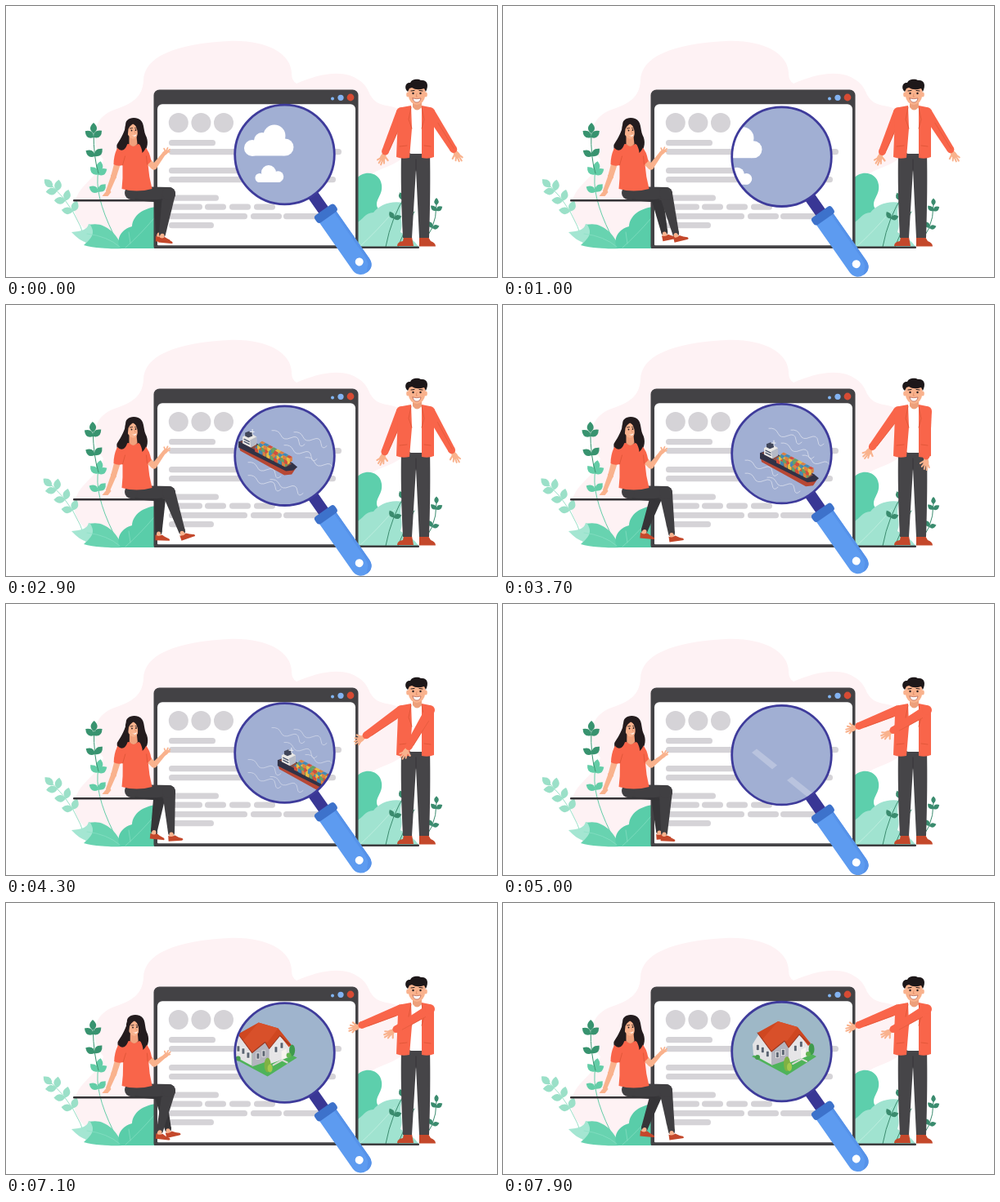
An HTML page with a canvas that plays this animation: 600 by 332 pixels, repeating every 8000 ms.

```html
<!DOCTYPE html>
<html lang="en">
<head>
<meta charset="utf-8">
<title>Search illustration</title>
<style>
html, body { margin: 0; width: 100%; height: 100%; overflow: hidden; background: #fff; }
canvas { display: block; width: 600px; height: 332px; }
</style>
</head>
<body>
<canvas id="stage" width="600" height="332"></canvas>
<script>
const c = document.getElementById('stage').getContext('2d');
const LOOP = 8000;
const DARK = '#434245', ORANGE = '#f9654a', SKIN = '#f9b28d', SHOE = '#c4482b', HAIR = '#241c1e', GREY = '#d5d3d7';

const clamp = v => Math.max(0, Math.min(1, v));
const ramp = (t, a, b) => clamp((t - a) / (b - a));
const ease = p => (1 - Math.cos(Math.PI * p)) / 2;
const out = p => 1 - (1 - p) * (1 - p);

// Eased value from [time, value, time, value, ...]
function key(t, k) {
  let i = 0;
  while (i < k.length - 4 && t > k[i + 2]) i += 2;
  return k[i + 1] + (k[i + 3] - k[i + 1]) * ease(ramp(t, k[i], k[i + 2]));
}

function fill(d, color) { c.fillStyle = color; c.fill(new Path2D(d)); }
function line(d, color, w = 1) {
  c.strokeStyle = color; c.lineWidth = w; c.lineCap = 'round'; c.lineJoin = 'round';
  c.stroke(new Path2D(d));
}
function disc(x, y, r, color, ry = r, rot = 0) {
  c.fillStyle = color; c.beginPath(); c.ellipse(x, y, r, ry, rot, 0, 7); c.fill();
}
function box(x, y, w, h, r, color) {
  c.fillStyle = color; c.beginPath(); c.roundRect(x, y, w, h, r); c.fill();
}
function at(x, y, rot, draw) {
  c.save(); c.translate(x, y); c.rotate(rot); draw(); c.restore();
}
// Tapered limb with round ends
function limb(x1, y1, x2, y2, r1, r2, color) {
  const a = Math.atan2(y2 - y1, x2 - x1) + Math.PI / 2, s = Math.cos(a), n = Math.sin(a);
  c.fillStyle = color;
  c.beginPath();
  c.moveTo(x1 + s * r1, y1 + n * r1); c.lineTo(x2 + s * r2, y2 + n * r2);
  c.lineTo(x2 - s * r2, y2 - n * r2); c.lineTo(x1 - s * r1, y1 - n * r1);
  c.fill();
  disc(x1, y1, r1, color); disc(x2, y2, r2, color);
}

function leaf(x, y, len, ang, color) {
  const w = len * .62;
  at(x, y, ang, () => fill(`M0 0Q${len * .45} ${-w} ${len} 0Q${len * .45} ${w} 0 0`, color));
}
// Curved stem with leaf pairs between fractions u0 and u1
function sprig([x0, y0, cx, cy, x1, y1], u0, u1, n, len, color, tip = true) {
  line(`M${x0} ${y0}Q${cx} ${cy} ${x1} ${y1}`, color, 1);
  for (let i = 0; i < n; i++) {
    const u = u0 + (u1 - u0) * i / Math.max(1, n - 1), v = 1 - u;
    const x = v * v * x0 + 2 * u * v * cx + u * u * x1, y = v * v * y0 + 2 * u * v * cy + u * u * y1;
    const a = Math.atan2(v * (cy - y0) + u * (y1 - cy), v * (cx - x0) + u * (x1 - cx));
    leaf(x, y, len, a - .9, color);
    leaf(x, y, len, a + .9, color);
  }
  if (tip) leaf(x1, y1 + 1, len, Math.atan2(y1 - cy, x1 - cx), color);
}

function scenery(t) {
  const s = Math.sin(t / 620);
  fill('M168 92C168 62 208 46 272 43C318 41 348 58 349 82Q349 92 355 95C376 86 400 79 420 85C436 91 441 99 445 109C452 121 461 121 470 123C496 128 508 150 494 175C478 200 455 195 440 212L400 250L150 285C104 290 80 266 84 242C88 218 114 210 119 188C101 165 106 138 130 128C156 119 166 112 168 92Z', '#fef2f4');

  sprig([98, 290, 86, 248, 57 + s, 221], .5, .9, 3, 14, '#9be0c8');
  const top = 107 + s * .8;
  sprig([131, 279, 107, 230, 113, 202], .6, .92, 2, 13, '#63cda7');
  sprig([113, 205, 107, 186, top, 155], .48, .9, 2, 13, '#38936f');

  fill('M142 297C128 299 112 296 101 290C92 289 86 283 80 277C93 276 99 274 101 267C119 269 137 280 142 297Z', '#a4e6d2');
  fill('M95 293C104 285 110 279 103 268C120 264 137 279 142 297C125 297 107 297 95 293Z', '#68d3b0');
  fill('M139 297C134 284 142 273 154 270C155 256 168 248 183 246V297Z', '#59cda9');
  line('M146 296Q163 281 181 260M99 279Q124 282 139 295M152 291L150 277', '#8ae0c5', .7);

  fill('M428 212C437 200 457 203 459 219C461 232 450 237 454 247C462 255 448 270 428 282Z', '#5dcfac');
  fill('M428 296V266C436 262 439 253 449 253C456 244 470 238 485 241C478 254 487 264 482 277C492 283 500 288 505 296Z', '#a0e3d0');
  line('M432 295Q452 277 475 250', '#c5f0e3', .8);
  sprig([464, 295, 471, 258, 489, 231 + s * .5], .5, .88, 2, 10, '#3a8b6e');
  line('M479 295Q487 275 499 252', '#3a8b6e');
  sprig([505, 293, 526, 276, 526, 243 + s * .4], .5, .88, 2, 9, '#3a8b6e');
}

function browser() {
  box(82, 237, 124, 2.5, 1, '#343235');
  box(181, 294.5, 324, 2.5, 1, '#3d3c3e');
  box(180.5, 102.5, 250, 194.5, [7, 7, 2, 2], DARK);
  box(185, 120.3, 242, 173, [6, 6, 1, 1], '#fff');
  disc(399, 113.5, 2, '#82b6f3');
  disc(409, 112.3, 3.6, '#83b3f2');
  disc(421, 112, 4.4, '#d64b34');
  for (const x of [210.8, 238.4, 266]) disc(x, 143, 12, GREY);
  const bars = [[164, 199, 256], [175, 199, 410], [198, 199, 390], [209, 199, 403], [231.5, 199, 260],
    [242.5, 199, 240], [242.5, 243, 269], [242.5, 273, 299], [242.5, 303, 329],
    [254, 199, 295], [254, 299, 337], [254, 339, 386], [265, 199, 254]];
  for (const [y, a, b] of bars) box(a, y, b - a, 7.3, 3.6, GREY);
}

function shin(x, y, len, dx, r, color) {
  const a = Math.asin(dx / len), ax = x + dx, ay = y + len * Math.cos(a);
  limb(x, y, ax, ay, r, 4, color);
  limb(ax, ay + 2, ax + Math.sin(a) * 4, ay + 4, 2.5, 2.5, SKIN);
  at(ax + Math.sin(a) * 3, ay + 3.5, -Math.max(-.1, a), () =>
    fill('M-4 0Q0 3 4 0Q8 3 13 4.500Q15 7 12 7H-4Z', SHOE));
}

function woman(t) {
  const front = key(t, [0, -8, 1900, 29, 3700, 7, 5000, -2, 5800, 30, 7100, -11, 7900, 7]);
  const back = key(t, [0, -1, 1900, 18, 3700, -15, 5000, 3, 5800, 1, 7100, 10, 7900, -15]);
  const sway = key(t, [0, 0, 3700, 0, 5000, 1, 5800, 2, 7100, 1.5, 7900, 0]);
  const hx = key(t, [0, 193, 3700, 193, 5800, 195, 7900, 193]);
  const hy = key(t, [0, 181, 1900, 180, 3700, 181, 5000, 187, 5800, 193, 7100, 188, 7900, 184]);

  limb(156, 231, 188, 233, 7, 7.500, '#363538');
  shin(188, 233, 45, back, 7.500, '#363538');
  limb(153, 229, 199, 230, 8, 8, '#403f42');
  shin(199, 230, 50, front, 8, '#403f42');
  line('M158 237Q178 239 191 237', '#343336', 1);

  c.save();
  c.transform(1, 0, -sway / 75, 1, sway * 228 / 75 - .5, 0);
  fill('M147 147C145 139 154 135 162 138C170 141 168 151 171 158C175 165 174 175 168 180C160 175 152 181 144 179C139 181 135 176 136 170C139 165 144 158 147 147Z', HAIR);
  // Supporting arm
  limb(138, 188, 132, 209, 4, 3.3, SKIN);
  limb(132, 209, 125, 227, 3.3, 2.5, SKIN);
  fill('M127 225L122 228L118 233L125 233L129 228Z', SKIN);
  limb(172, 188, 181, 197, 4, 3.4, SKIN);
  fill('M151 169Q140 169 136 175Q132 184 132 194Q137 197 143 195L143 211L142 224Q160 229 179 224Q175 209 174 194L178 190Q176 178 170 172L162 169Q156 173 151 169Z', ORANGE);
  line('M143 195L146 184M173 194L172 184', '#dc5335', .8);
  fill('M151 160H160L161 169Q156 175 151 169Z', '#f1a17c');
  disc(155, 153.5, 6.6, SKIN, 9.3, -.2);
  fill('M146 151C145 142 154 137 161 141C157 143 152 146 150 151Q149 158 149 168C147 177 141 179 137 174C140 168 146 160 146 151Z', HAIR);
  fill('M155 140C165 139 167 150 168 157C174 164 174 174 167 180C167 172 161 168 161 160C162 152 160 146 155 143Z', HAIR);
  disc(154, 152.5, .9, HAIR); disc(159, 152, .9, HAIR);
  line('M152 150L155 149.500M158 149.500L160 150', HAIR, .8);
  fill('M154 158Q157 160 160 157Q159 162 154 158Z', '#fff');
  line('M157.500 153L158.500 156', '#d98662', .6);
  c.restore();

  limb(181 + sway / 3, 197, hx, hy, 3.4, 2.2, SKIN);
  at(hx, hy, -.65, () => {
    disc(2, 0, 3.4, SKIN, 2.6);
    line('M3 -1L4 -5M4 -1L8 -3M4 0L9 0M4 1L7 2', SKIN, 1.7);
  });
}

function arm(x, y, deg, len, side) {
  const a = deg * Math.PI / 180, ex = x + Math.cos(a) * len, ey = y + Math.sin(a) * len;
  at(ex, ey, a, () => {
    limb(-4, 0, 3, 0, 2.7, 2.7, SKIN);
    disc(5, 0, 4, SKIN, 3.5);
    line('M6 -2L11 -4M7 -1L14 -1M7 1L13 2M6 2L10 5', SKIN, 2);
    line(`M3 ${side * 2}L6 ${side * 7}`, SKIN, 2.2);
  });
  limb(x, y, ex - Math.cos(a) * 3, ey - Math.sin(a) * 3, 6, 4.4, ORANGE);
  line(`M${x + Math.cos(a) * 11 + 4} ${y + Math.sin(a) * 11 + 4}L${ex - Math.cos(a) * 8 + 3} ${ey - Math.sin(a) * 8 + 3}`, '#e05a3c', .7);
}

function man(t) {
  const left = key(t, [0, 112, 2900, 112, 3700, 126, 4800, 158]);
  const leftLen = key(t, [0, 55, 3700, 57, 4800, 55]);
  const right = key(t, [0, 57.700, 2700, 57.700, 3700, 91, 4900, 149]);
  const rightLen = key(t, [0, 57, 3700, 58, 4900, 51]);

  fill('M486 283H496L498 294H478Q478 289 485 288Z', SHOE);
  fill('M505 283H516L519 288Q525 290 525 294.500H505Z', SHOE);
  fill('M483 180H518Q519 224 517 284H505L501 200L496 284H485Q482 225 483 180Z', '#464548');
  line('M501 188L501 202', '#333235', .8);

  const armR = () => arm(518, 130, right, rightLen, right > 100 ? -1 : 1);
  if (right < 96) armR();
  arm(483, 130, left, leftLen, left > 130 ? 1 : -1);

  box(493, 123, 18, 58, 2, '#fff');
  fill('M497 115H508V124Q502 131 497 124Z', '#eda07b');
  fill('M495 122L484 124Q478 127 479 136L477 185Q484 188 493 186L496 150Z', ORANGE);
  fill('M508 122L518 124Q524 127 523 137L523 185Q516 188 508 186L508 150Z', ORANGE);
  line('M495 124L492 139L496 150M508 124L511 139L508 150M481 172L490 171M511 171L519 172', '#dc5335', .8);
  if (right >= 96) armR();

  disc(491, 108.500, 1.8, SKIN, 3); disc(513, 108.500, 1.8, SKIN, 3);
  fill('M491.500 98H512.500V109Q511 120 502 121Q493 120 491.500 109Z', SKIN);
  fill('M491 105C486 101 488 93 494 94C496 89 504 89 507 91C515 90 517 97 513 105L511 101Q502 104 496 100L493 101Z', '#1d1719');
  disc(497.500, 107, 1.2, HAIR); disc(506.500, 107, 1.2, HAIR);
  line('M495 104L499 103.500M505 103.500L509 104', HAIR, 1);
  line('M502 107.500L501.200 111H502.500', '#d98662', .7);
  fill('M497 113Q502 114.500 507 113Q506 118 502 118Q498 118 497 113Z', '#fff');
  line('M497 113Q502 114.500 507 113Q506 118 502 118Q498 118 497 113', '#a64a3b', .6);
}

function clouds(t) {
  c.globalAlpha = 1 - ramp(t, 1100, 1700);
  at(-t * .035, 0, 0, () => {
    disc(301, 174, 10, '#fff'); disc(313, 165, 10, '#fff'); disc(328, 159, 13.500, '#fff');
    disc(341, 173, 10.500, '#fff'); box(296, 168, 50, 15.500, 7, '#fff');
    disc(310, 210.500, 5.500, '#fff'); disc(321, 204, 9, '#fff');
    disc(332.500, 209, 6.800, '#fff'); box(306, 208, 31, 8, 4, '#fff');
  });
}

function ship(t) {
  c.globalAlpha = ramp(t, 2300, 2900) * (1 - ramp(t, 4200, 4700));
  for (const [x, y] of [[325, 151], [352, 153], [340, 169], [296, 190], [296, 206], [323, 211], [366, 184]])
    line(`M${x} ${y}q8 -1 11 6t12 3t10 5t7 3`, '#d5dbea', .9);
  c.globalAlpha = 1;
  const p = -100 * (1 - out(ramp(t, 2400, 3600))) + 110 * ramp(t, 4000, 4700) ** 2;
  at(350 + p * .88, 194 + p * .48, 0, () => {
    fill('M-36 -10L25 19L35 18L29 27L20 28L-34 -2Z', '#b74835');
    fill('M-36 -13L-25 -17L30 13L36 18L31 22L22 23L-36 -6Z', '#313246');
    fill('M-34 -13L-25 -16L29 14L22 18Z', '#8b5148');
    const hues = ['#d34f3c', '#e7bd45', '#4289b5', '#64a167', '#dc8142'];
    for (let i = 0; i < 8; i++) for (let j = 0; j < 3; j++) {
      const x = -16 + i * 4.700 + j * 2.900, y = -6 + i * 2.450 - j * 2.800;
      fill(`M${x} ${y}l4 2v5l-4 -2z`, hues[(i * 2 + j) % 5]);
      fill(`M${x + 4} ${y + 2}l3 -2v5l-3 2z`, hues[(i + j * 3 + 1) % 5]);
      fill(`M${x} ${y}l3 -2l4 2l-3 2z`, hues[(i * 3 + j + 2) % 5]);
    }
    fill('M-31 -19L-22 -24L-14 -19V-10L-21 -6L-31 -11Z', '#e9e8e6');
    fill('M-22 -15L-14 -19V-10L-21 -6Z', '#b5bac7');
    line('M-29 -16L-23 -13M-29 -13L-23 -10', '#4e5870', 1.4);
    fill('M-28 -24l5 -2 4 2v4l-5 2 -4 -2z', '#40465a');
    line('M-19 -22V-28M-17 -25H-22', '#eceff4', 1);
  });
}

function car(t) {
  c.globalAlpha = ramp(t, 4850, 5450) * (1 - ramp(t, 6300, 6700));
  for (const [x, y] of [[347, 213], [304, 179]]) fill(`M${x} ${y}l6 -4.500l25 20l-6 5z`, '#fff');
  c.globalAlpha = 1;
  const p = -75 * (1 - out(ramp(t, 5200, 5950))) + 125 * ramp(t, 6000, 6750) ** 2;
  at(308 + p * .85, 184 + p * .55, 0, () => {
    fill('M-32 4L2 26Q12 29 26 21L30 15L-10 0Z', '#7d839c');
    fill('M-33 -8L-26 -12Q-24 -22 -10 -26Q5 -29 13 -20L24 -7Q31 0 30 11Q27 20 7 24L-4 19L-32 4Z', '#c43a1e');
    fill('M-22 -18Q-10 -27 2 -26Q10 -24 13 -20L-4 -11Q-14 -16 -22 -18Z', '#dc4d2a');
    fill('M-4 -10L13 -19L23 -8Q12 -5 4 2Q2 -5 -4 -10Z', '#33363c');
    fill('M-25 -12L-22 -17Q-13 -16 -7 -10Q-2 -5 0 2L-12 -3Z', '#352b30');
    line('M-14 -14L-10 -2', '#c43a1e', 1.5);
    fill('M4 3Q12 -4 24 -7Q29 -2 30 5Q18 6 9 13Q4 9 4 3Z', '#d84926');
    line('M-29 -3L5 15M-12 -3L-8 10', '#92301d', .8);
    disc(-2, 16, 4, '#25262a', 6, -.4); disc(-2, 16, 2, '#9fa3ab', 3.300, -.4);
    disc(-27, 1, 3, '#25262a', 5, -.4);
    disc(10, 15, 3.500, '#e6e0d2', 2, -.6); disc(28, 7, 2, '#e6e0d2', 1.800);
    line('M15 18L26 13', '#4b4a4c', 2);
    line('M17 16L22 14', '#86d3b2', 2.5);
    line('M8 22Q20 21 28 15', '#9e2f1d', 1.2);
  });
}

function house(t) {
  const p = -110 * (1 - out(ramp(t, 6700, 7500)));
  if (t < 6700) return;
  at(342 + p, 178, 0, () => {
    fill('M-38 10L5 33L41 10L4 -9Z', '#4fb35a');
    fill('M-37 -5L-29 -18L-14 2V20L-36 8Z', '#e3e2e4');
    fill('M-14 0L2 -14L12 -4V12L-14 21Z', '#b4b4be');
    fill('M7 -4L21 -20L32 -5V9L7 18Z', '#e6e5e7');
    fill('M-31 -19L-6 -33L18 -26L34 -6L31 -3L20 -17L7 -1L2 -9L-14 4Z', '#cf4720');
    fill('M-6 -33L18 -26L5 -9L2 -9L-14 4L-25 -11Z', '#d8502a');
    line('M-31 -19L-14 4L2 -9L7 -1L20 -17L33 -5', '#9c3822', 1.1);
    for (const [x, y] of [[-33, -5], [-27, -2], [-21, 3], [-9, 4], [-2, 1], [13, -4], [20, -9]]) {
      box(x, y, 4.500, 8, 0, '#f5f4f2'); box(x + .8, y + .8, 3, 6.400, 0, '#5b6472');
    }
    fill('M22 2L28 -1V10L22 13Z', '#f7f4ef');
    line('M12 19L23 13L29 16', '#dbd9d4', 2);
    disc(-31, 11, 3, '#479c4d'); disc(35, 1, 3.500, '#3f9b4c', 7); disc(31, 7, 3, '#63b651');
    disc(5, 19, 4, '#7fb144', 9); disc(8, 23, 3, '#a4c84d', 5);
  });
}

function glass(t) {
  const y = 2.600 * (1 - Math.cos(t / 3900 * Math.PI * 2));
  c.save();
  c.translate(0, y);
  at(340.500, 182, Math.atan2(131, 91.500), () => {
    box(59, -7, 28, 14, 1, '#393795');
    box(88, -12, 88, 25, [3, 12, 12, 3], '#5d9bf0');
    fill('M92 -12H163Q176 -12 176 1L168 -7Q163 -9 156 -9H92Z', '#5692e9');
    box(82.500, -15, 11, 30, 4, '#3d72cb');
    disc(160, .5, 5, '#fff');
  });
  const k = ramp(t, 6400, 7700), mix = (a, b) => a + (b - a) * k;
  disc(340.500, 182, 60.500, `rgb(${mix(161, 158)},${mix(175, 184)},${mix(211, 199)})`);
  c.save();
  c.beginPath(); c.arc(340.500, 182, 60, 0, 7); c.clip();
  if (t < 1750) clouds(t);
  if (t > 2250 && t < 4750) ship(t);
  if (t > 4800 && t < 6850) car(t);
  house(t);
  c.restore();
  c.strokeStyle = '#3e3b9b'; c.lineWidth = 2.800;
  c.beginPath(); c.arc(340.500, 182, 60.800, 0, 7); c.stroke();
  c.restore();
}

function frame(now) {
  const t = now % LOOP;
  c.globalAlpha = 1;
  c.fillStyle = '#fff';
  c.fillRect(0, 0, 600, 332);
  scenery(t);
  browser();
  woman(t);
  man(t);
  glass(t);
  requestAnimationFrame(frame);
}
requestAnimationFrame(frame);
</script>
</body>
</html>
```
